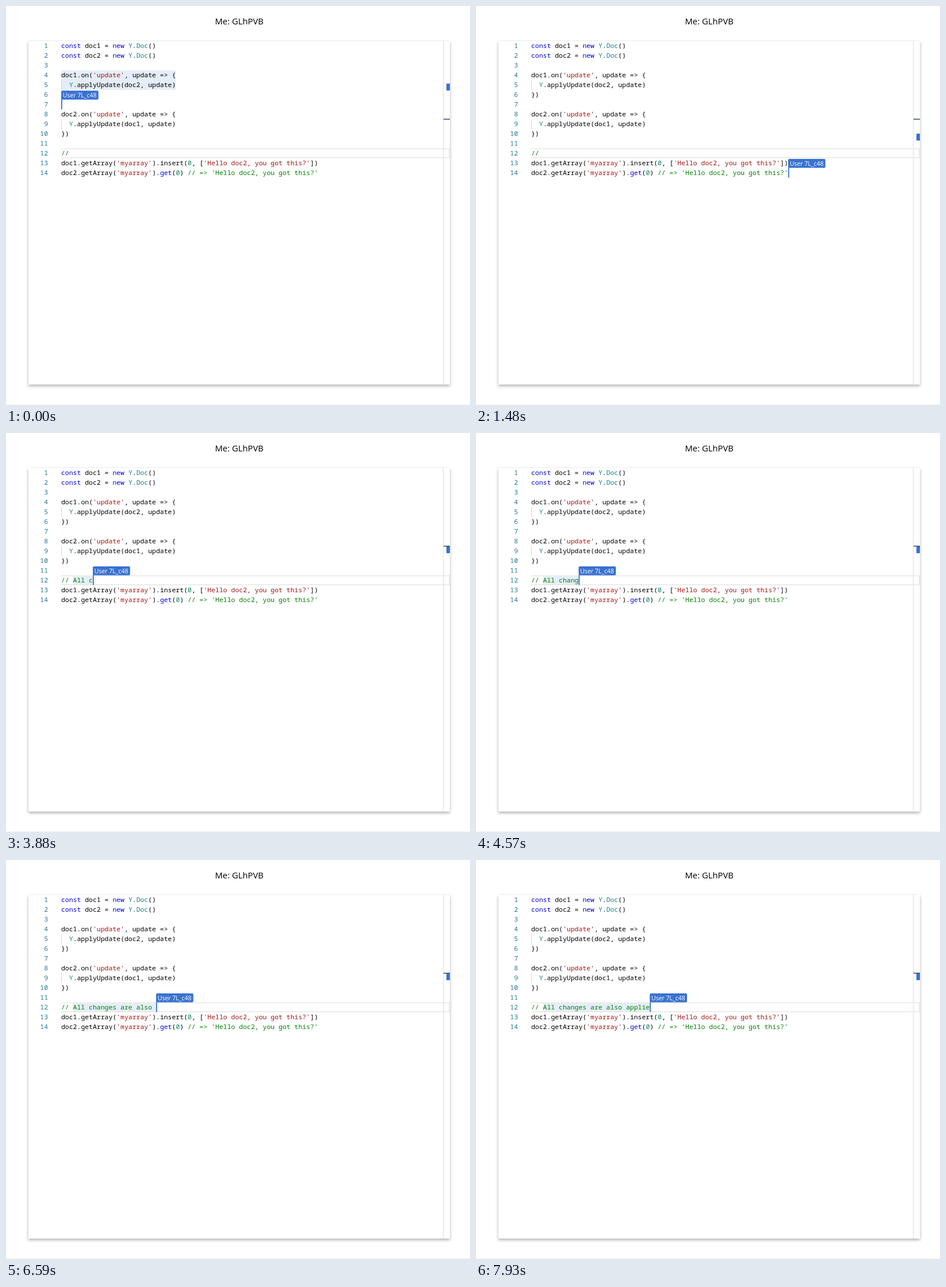
Write an HTML page with a canvas that moves like this. It is 807 px wide and 694 px high and loops after 8 s.

```html
<!DOCTYPE html>
<html lang="en">
<head>
<meta charset="utf-8">
<title>Shared editor</title>
<style>
  html, body { margin: 0; width: 100%; height: 100%; overflow: hidden; background: #fff; }
  canvas { display: block; width: 807px; height: 694px; }
</style>
</head>
<body>
<canvas id="stage" width="807" height="694"></canvas>
<script>
const ctx = document.getElementById('stage').getContext('2d');

const LOOP = 8000;
const LEFT = 96, TOP = 61, CHAR = 6.875, LINE = 16.96;
const CODE_FONT = '11.46px "Noto Sans Mono", "DejaVu Sans Mono", monospace';
const TITLE_FONT = '14.8px "Open Sans", "Noto Sans", sans-serif';
const LABEL_FONT = '10.5px "Open Sans", "Noto Sans", sans-serif';
const PEER = '#3a72d0', SELECTION = '#e5eef8';
const PEER_NAME = 'User 7L_c48';

const CODE = `const doc1 = new Y.Doc()
const doc2 = new Y.Doc()

doc1.on('update', update => {
  Y.applyUpdate(doc2, update)
})

doc2.on('update', update => {
  Y.applyUpdate(doc1, update)
})

//
doc1.getArray('myarray').insert(0, ['Hello doc2, you got this?'])
doc2.getArray('myarray').get(0) // => 'Hello doc2, you got this?'`.split('\n');
const COMMENT_LINE = 12;
const COMMENT = '// All changes are also applied';

// Token rules, first match wins
const RULES = [
  [/^\/\/.*/, '#008000'],
  [/^'[^']*'/, '#a31515'],
  [/^(const|new|get)\b/, '#0000e6'],
  [/^(Y|Doc)\b/, '#1c7f90'],
  [/^\d+\b/, '#098658'],
  [/^\w+/, '#000'],
  [/^[^\w'\/]+/, '#000'],
  [/^./, '#000']
];

// Remote caret jumps: time, line, column
const JUMPS = [
  [0, 7, 0], [470, 9, 0], [940, 11, 0],
  [1480, 14, 65], [1780, 13, 38], [2180, 12, 3]
];
// Typing bursts: first key, last key, number of keys
const BURSTS = [
  [3090, 3090, 1], [3410, 3880, 4], [4190, 4570, 4], [4960, 5510, 5],
  [5660, 5980, 3], [6130, 6590, 4], [6760, 7080, 3], [7230, 7450, 2], [7930, 7930, 1]
];

const lineTop = n => TOP + (n - 1) * LINE;
const colX = c => LEFT + c * CHAR;

function typedKeys(t) {
  let keys = 0;
  for (const [first, last, n] of BURSTS) {
    if (t < first) break;
    const gap = (last - first) / (n - 1) || 1;
    keys += Math.min(n, Math.floor((t - first) / gap + 1e-6) + 1);
  }
  return keys;
}

function rect(x, y, w, h, color) {
  ctx.fillStyle = color;
  ctx.fillRect(x, y, w, h);
}

function text(str, x, y, font, color, align = 'left') {
  ctx.font = font;
  ctx.fillStyle = color;
  ctx.textAlign = align;
  ctx.fillText(str, x, y);
}

function drawCode(str, line) {
  const y = lineTop(line) + 12.3;
  let col = 0;
  while (col < str.length) {
    const rest = str.slice(col);
    const [rule, color] = RULES.find(([re]) => re.test(rest));
    const token = rest.match(rule)[0];
    text(token, colX(col), y, CODE_FONT, color);
    col += token.length;
  }
}

function drawPanel() {
  rect(0, 0, 807, 694, '#fff');
  rect(0, 693, 807, 1, '#f1f1f1');
  ctx.save();
  ctx.shadowColor = 'rgba(0,0,0,.32)';
  ctx.shadowBlur = 5;
  ctx.shadowOffsetY = 2;
  rect(39, 61, 733, 597.5, '#fff');
  ctx.restore();
  text('Me: GLhPVB', 363.5, 32, TITLE_FONT, '#000');
}

function drawSelection(t, typed) {
  if (t < JUMPS[1][0]) {
    rect(LEFT, 112, 29 * CHAR, 34, SELECTION);
    rect(LEFT, 146, 2 * CHAR, 17, SELECTION);
  } else if (typed > 1) {
    rect(colX(3), 248, typed * CHAR, 16.5, SELECTION);
  }
}

function drawCurrentLine() {
  rect(LEFT, 247.6, 675.5, 1.6, '#e8e8e8');
  rect(LEFT, 263, 675.5, 1.6, '#e8e8e8');
  rect(770.4, 247.6, 1.4, 17, '#e8e8e8');
}

function drawRuler(line) {
  rect(760, 61, 1, 597.5, '#dedede');
  rect(766, Math.round(135 + (line - 7) * 12.4), 6, 12, PEER);
  rect(761, 196, 11, 1.6, '#42566a');
}

function drawPeer(line, col) {
  const x = colX(col), y = lineTop(line);
  rect(x, y - 0.5, 1.8, LINE + 0.5, PEER);
  ctx.fillStyle = PEER;
  ctx.beginPath();
  ctx.roundRect(x, y - 15.6, 64.8, 15.6, 2);
  ctx.fill();
  text(PEER_NAME, x + 2.8, y - 3.6, LABEL_FONT, '#fff');
}

function draw(t) {
  const typed = typedKeys(t);
  const [, line, baseCol] = JUMPS.filter(j => j[0] <= t).pop();

  drawPanel();
  drawSelection(t, typed);
  drawCurrentLine();
  for (const n of [5, 9]) rect(LEFT, lineTop(n), 1, LINE, '#d3d3d3');
  CODE.forEach((str, i) => {
    const n = i + 1;
    text(n, 73, lineTop(n) + 12.3, CODE_FONT, '#237893', 'right');
    drawCode(n === COMMENT_LINE ? COMMENT.slice(0, 3 + typed) : str, n);
  });
  drawRuler(line);
  drawPeer(line, baseCol + typed);
}

function tick() {
  draw(performance.now() % LOOP);
  requestAnimationFrame(tick);
}
tick();
</script>
</body>
</html>
```
